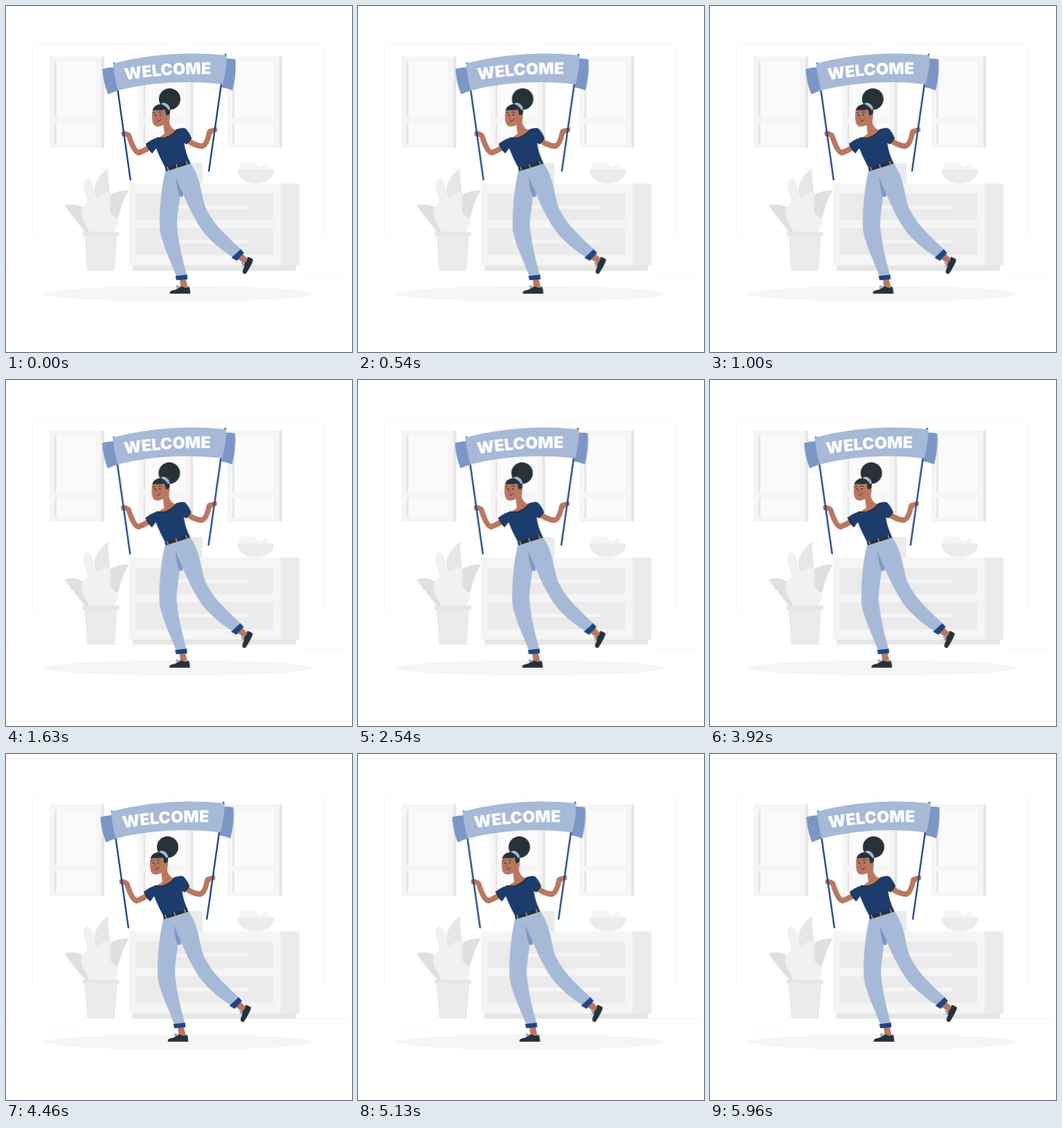
An HTML page that plays this animation: 500x500 px, repeating every 6000 ms.

```html
<!DOCTYPE html>
<html lang="en">
<head>
<meta charset="utf-8">
<title>Welcome</title>
<style>
  html, body { margin: 0; width: 100%; height: 100%; overflow: hidden; background: #fff; }
  svg { display: block; width: 500px; height: 500px; }
  .g1 { fill: #fafafa; }
  .g2 { fill: #f5f5f5; }
  .g3 { fill: #ebebeb; }
  .g4 { fill: #e6e6e6; }
  .g5 { fill: #e0e0e0; }
  .hairline { fill: none; stroke: #ebebeb; stroke-width: .4; }
  .light { fill: #a6b9d7; }
  .fold { fill: #7c97c5; }
  .navy { fill: #1c3c6e; }
  .cuff { fill: #204583; }
  .dark { fill: #263238; }
  .skin { fill: #b97760; }
  .arm { fill: none; stroke: #b97760; stroke-linecap: round; stroke-linejoin: round; }
  .pole { fill: none; stroke: #204583; stroke-width: 2.4; stroke-linecap: round; }
  .ink { fill: none; stroke: #263238; stroke-linecap: round; }
  .title { font: 900 23.4px Inter, "Liberation Sans", sans-serif; fill: #fff; text-anchor: middle; }
  .person { animation: shake 3s linear infinite; }
  @keyframes shake {
    0%, 100% { transform: translateX(0); }
    10%, 90% { transform: translateX(-1px); }
    20%, 80% { transform: translateX(2px); }
    30%, 50%, 70% { transform: translateX(-4px); }
    40%, 60% { transform: translateX(4px); }
  }
</style>
</head>
<body>
<svg viewBox="0 0 500 500">
  <defs>
    <g id="window">
      <path class="g4" d="M70 73H142V205H70Z"/>
      <path class="g2" d="M63 73H138V205H63Z"/>
      <path class="g1" d="M70 80H130.500V161.500H70ZM70 169.500H130.500V199H70Z"/>
      <path class="g4" d="M70 80H73V161.500H70ZM70 169.500H73V199H70Z"/>
    </g>
    <g id="drawer">
      <rect class="g3" x="188" y="271" width="198" height="39"/>
      <rect class="g2" x="223" y="288" width="128" height="5" rx="2"/>
    </g>
    <path id="baseline" d="M167.500 107.900Q234 97 301 98.600"/>
  </defs>

  <!-- room -->
  <rect class="hairline" x="38.300" y="55.100" width="204.300" height="282.500" rx="5.600"/>
  <rect class="hairline" x="254.600" y="55.100" width="204.300" height="282.500" rx="5.600"/>
  <path class="hairline" d="M0 382.500H500M52 391.300H112M192 394.200H360M424 388.700H490"/>
  <use href="#window"/>
  <use href="#window" x="128.400"/>
  <use href="#window" x="257"/>

  <!-- dresser -->
  <path class="g4" d="M183 375H419V382.400H183Z"/>
  <path class="g3" d="M397 256.500H424V375H397Z"/>
  <path class="g2" d="M178 256.500H397V375H178Z"/>
  <use href="#drawer"/>
  <use href="#drawer" y="50"/>
  <path class="g3" d="M250 227H284V256.500H250Z"/>
  <path class="g2" d="M337 237C336 230 340 223 345 225L352 228L357 225L363 231L368 233L375 226L380 233L384 237Z"/>
  <path class="g3" d="M334 236.500H388C387 248 376 256.300 361 256.300S335 248 334 236.500Z"/>

  <!-- plant -->
  <path class="g4" d="M148 234C132 245 126 259 128 273L136 300L150 278C151 262 146 249 148 234Z"/>
  <path class="g5" d="M84.500 288.500C97 284 111 287 117 298L124 326H114C106 316 95 303 84.500 288.500Z"/>
  <path class="g5" d="M178 266.500C162 266 148 271 146 282L142 322L159 315C165 299 167 281 178 266.500Z"/>
  <path style="fill:#f1f1f1" d="M113 252C117 247 123 250 125 257C128 267 128 275 133 278C140 272 145 268 148 271C153 278 149 290 151 299C155 304 163 307 162 314L157 326H120C115 314 108 306 109 296C111 289 118 287 117 280C115 270 109 261 113 252Z"/>
  <path class="g3" d="M113 330H161L157 382.400H117.500Z"/>
  <path class="g4" d="M110.500 326H163.500V332H110.500Z"/>

  <ellipse class="g2" cx="249.700" cy="416" rx="193.800" ry="11.300"/>

  <g class="person">
    <!-- shoes and ankles -->
    <path class="skin" d="M251 394L259.500 393L262.500 406L252.500 407ZM333 364L341 357.500L350 366L345.500 373Z"/>
    <path class="dark" d="M237 415.700C236 412.500 238 411.300 243 410.500C248 409.500 251 405.500 254 405.200Q259 408 264.500 405.400C266 408 266.300 412 266.400 415.700Z"/>
    <path class="dark" d="M349 362.500C351 362.700 355 364.500 357.200 366.400C356 372 350 382 346.300 387.300C343.500 387.500 341.700 386 342 383.500C343 378 345.500 376 344.800 371.500Q349.500 368 349 362.500Z"/>
    <path class="ink" style="stroke:#204583" stroke-width=".7" d="M251 408L246.500 404.800Q249 402.500 251.500 407M250 408Q245 409 247 406.500M345 374L340.600 371Q341 374 345 374.500L341 376"/>

    <!-- trousers -->
    <path class="fold" d="M240 245L262 250L255 276L249 275Z"/>
    <path class="light" d="M230.500 237.500L256 231C254 248 252.500 264 251 278C249.500 292 246 309 247.500 322C250 346 256 370 261.500 389.500L246.500 391.500C239 371 226 345 222.500 325C221 300 224 264 230.500 237.500Z"/>
    <path class="light" d="M236 236L267 227.500C273 236 277 246 280 257C284 272 285 287 292 298C303 319 323 336 341.500 353.500L330 364C314 355 293 338 282 322C268 301 258 277 250 257Z"/>
    <path class="fold" d="M245.300 247C248 254 251 261 253.300 266.500L251 276C248 268 246.500 258 245.300 247Z"/>
    <path class="cuff" d="M244.800 390.300L261.800 388.200L262.300 395L246.300 396.300ZM339 351.500L344 356.800L333.500 368.200L325.800 363.700Z"/>

    <!-- arms -->
    <path class="arm" stroke-width="8" d="M209 203Q199 210 192 211.800"/>
    <path class="arm" stroke-width="7.500" d="M192 211.800C187 212 182 201 178.500 190"/>
    <path class="skin" d="M167 181.500L172.500 180.700L179 183.500Q183 187 181.500 192L176.500 192L174 189L167.500 188Q165.800 184 167 181.500Z"/>
    <path class="arm" stroke-width="8" d="M262 194Q274 202 283 202.500"/>
    <path class="arm" stroke-width="7.500" d="M283 202.500C288 202 292 193 293.500 184"/>
    <path class="skin" d="M290 184Q290 179 293.500 177.800L300 176L304.500 174.900Q306 179 305 181.500L299.500 183L297 186Z"/>

    <!-- top -->
    <path class="skin" d="M216 193L229 185L227 169L236.500 159L236 169Q238 175 242 178L249 180L246 190L222 196Z"/>
    <path class="navy" d="M218.500 190.500Q234 193 247.500 178C252 176 257 175.300 260 177.500C264 182 267 187 268 191L260.500 199.500L257.500 198C258.500 208 262 217 265.500 225L231.500 236C226 226 221 216 217 205.500L211.800 212.500C207.500 209 204 204 202.300 199C207 195 212.500 191.500 218.500 190.500Z"/>
    <path class="ink" stroke-width="1.800" d="M218.500 190.500Q235 194 247.500 178.500"/>
    <path class="ink" stroke-width="2" d="M203 199.500Q206 207 211.300 211.700M267.300 191Q264.500 196 260.700 198.800"/>
    <path class="dark" d="M229.800 234L264.500 223.500L266.800 227.800L231.300 239Z"/>
    <path style="fill:none;stroke:#a6b9d7;stroke-width:1.300" d="M233 232.800L235 238M246 229L247.800 234M260.500 224.500L262.500 229.500"/>

    <!-- head -->
    <circle class="dark" cx="236.500" cy="134.500" r="15.500"/>
    <path class="skin" d="M212 150C210.500 157 210.800 165 212.600 170C215 175.200 221 175 226 172.500C231 170 235.500 165 236.500 158L233 147Z"/>
    <path class="dark" d="M212 151C212.500 146 217 142.500 223.500 141.700C231 141 236.500 145 237.200 151C237.200 154 236.800 156.500 235.500 158.500L231.800 158C230.500 155.500 230.800 152 229.500 149.500C224 151.500 217 149.500 212 151Z"/>
    <path class="light" d="M224 141.500Q225.500 139 230 140Q236 142.500 237.300 149L234.600 150.500Q232 144.500 224 141.500Z"/>
    <path class="skin" d="M231.500 159Q235 155.500 237 158Q237.500 162 232.500 164Z"/>
    <ellipse class="dark" cx="215.800" cy="157.700" rx=".9" ry="1.300"/>
    <ellipse class="dark" cx="223" cy="157.300" rx=".9" ry="1.300"/>
    <path class="ink" stroke-width=".9" d="M212.500 154.500L215.500 153.600M220.800 153.500Q223 152.300 225 153.700"/>
    <path class="ink" style="stroke:#8f4f3e" stroke-width=".8" d="M218.500 157.500L217.300 162.500L219 163"/>
    <path class="ink" stroke-width=".8" d="M219 166.600Q222.500 166.500 224.300 163.800"/>

    <!-- banner -->
    <path class="pole" d="M156 82.800L179.800 250.800M317.200 70.200L293.200 238.400"/>
    <path class="fold" d="M139.500 91Q148 88.300 157 88.500L162.500 122.300Q154 124 147.500 127.800C143 116 140 104 139.500 91Z"/>
    <path class="fold" d="M317 76Q325 75.600 331.500 77C332.800 92 331 108 327.200 122Q320 118.500 311.500 117.500Z"/>
    <path class="light" d="M154.800 83Q235 62 319 71.200C318.700 85 316.500 100 313 113.200Q235 104 161.800 122Q156.500 104 154.800 83Z"/>
    <text class="title"><textPath href="#baseline" startOffset="50%">WELCOME</textPath></text>
  </g>
</svg>
</body>
</html>
```
